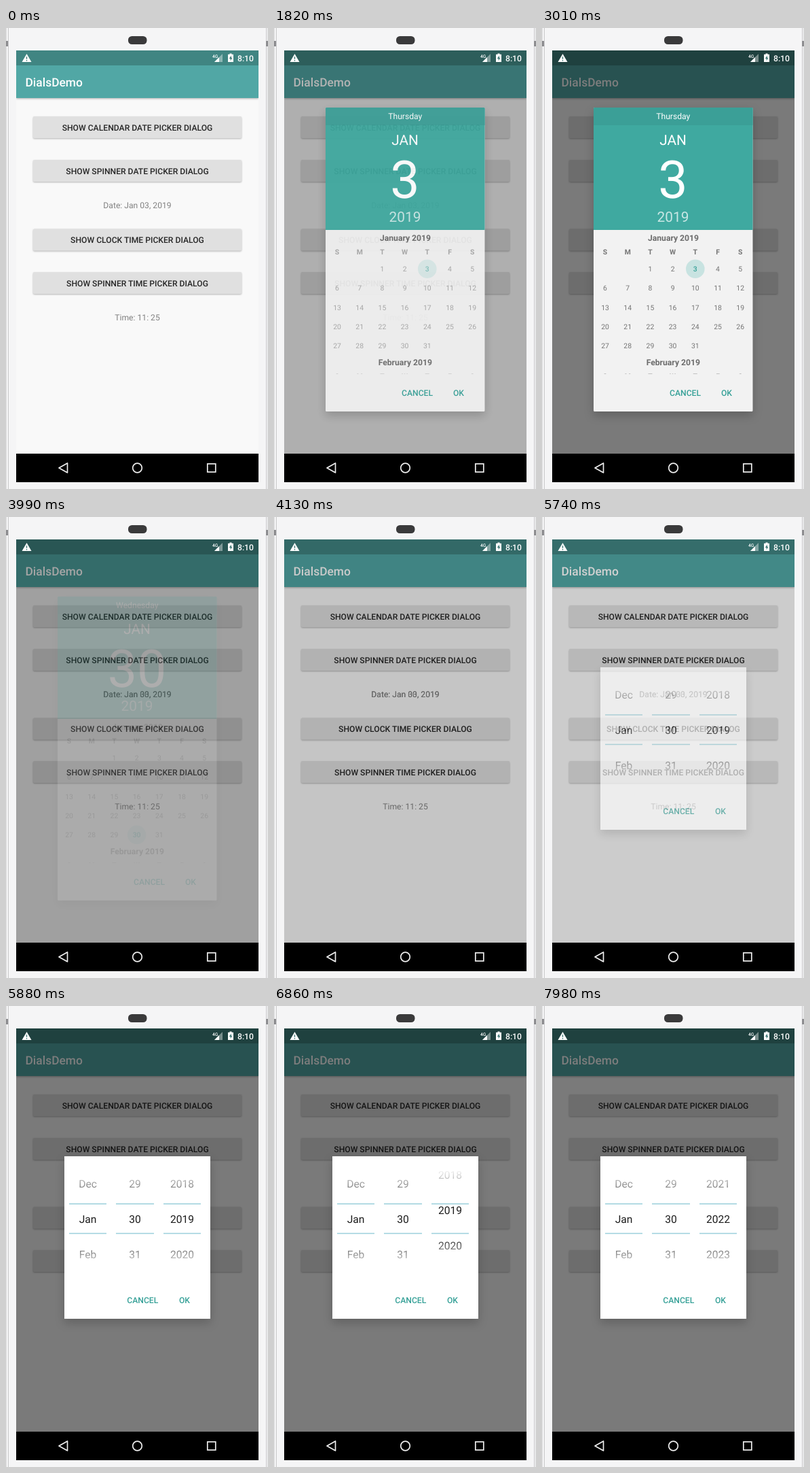
An HTML page for the animation above (8 s loop, 386 by 678 pixels).

```html
<!DOCTYPE html>
<html lang="en">
<head>
<meta charset="utf-8">
<title>Date pickers</title>
<style>
  html, body { margin: 0; width: 100%; height: 100%; overflow: hidden; background: #f5f5f6; }
  svg { display: block; width: 386px; height: 678px; font: 12.15px Roboto, sans-serif; text-rendering: geometricPrecision; }
  .mid { text-anchor: middle; }
  .med { font-weight: 500; }
  .bold { font-weight: 700; }
  .button rect { fill: #e0e0e0; filter: drop-shadow(0 1px .8px rgba(0, 0, 0, .28)); }
  .button text { fill: #262626; font-weight: 500; }
  .label { fill: #828282; }
  .days { font-size: 10.4px; fill: #757575; }
  .wheel { font-size: 15.6px; fill: #1c1c1c; }
  .action { fill: #35a097; font-weight: 500; }
  .card { filter: drop-shadow(0 6px 7px rgba(0, 0, 0, .2)); }

  #dim, #calendar, #spinner, .days, #years, .old, .new, .before, .after {
    animation: 8s linear infinite;
  }
  #dim { animation-name: dim; }
  #calendar { animation-name: calendar; }
  #spinner { animation-name: spinner; }
  .days { animation-name: days; }
  #years { animation-name: years; }
  .old, .new, .before, .after { animation-timing-function: step-end; }
  .old { animation-name: unpick; }
  .new { animation-name: pick; }
  .before { animation-name: unset; }
  .after { animation-name: set; }

  @keyframes dim {
    0%, 20.125% { opacity: 0; }
    22.75% { opacity: .58; }
    24.5% { opacity: .88; }
    26.25%, 48.125% { opacity: 1; }
    51.625% { opacity: .41; }
    53.4% { opacity: .2; }
    56%, 70.8% { opacity: 0; }
    71.75% { opacity: .35; }
    73.5%, 100% { opacity: 1; }
  }
  @keyframes calendar {
    0%, 20.125% { opacity: 0; }
    21.875% { opacity: .65; }
    22.75% { opacity: .93; }
    23.6%, 47.25% { opacity: 1; }
    49.875% { opacity: .15; }
    50.75%, 100% { opacity: 0; }
  }
  @keyframes spinner {
    0%, 70.8% { opacity: 0; }
    71.75% { opacity: .64; }
    72.6%, 100% { opacity: 1; }
  }
  @keyframes days {
    0%, 20% { opacity: .4; }
    22.75% { opacity: .6; }
    25.4%, 100% { opacity: 1; }
  }
  @keyframes years {
    0%, 84.875% { transform: translateY(0); }
    85.75% { transform: translateY(-12.8px); }
    87.5% { transform: translateY(-44px); }
    90% { transform: translateY(-88px); }
    92.5% { transform: translateY(-122px); }
    95.375% { transform: translateY(-147px); }
    98% { transform: translateY(-155px); }
    99.75%, 100% { transform: translateY(-156px); }
  }
  @keyframes pick { 0% { opacity: 0; } 38.5%, 100% { opacity: 1; } }
  @keyframes unpick { 0% { opacity: 1; } 38.5%, 100% { opacity: 0; } }
  @keyframes set { 0% { opacity: 0; } 48.125%, 100% { opacity: 1; } }
  @keyframes unset { 0% { opacity: 1; } 48.125%, 100% { opacity: 0; } }
</style>
</head>
<body>
<svg viewBox="0 0 386 678">
  <defs>
    <linearGradient id="fade" gradientUnits="userSpaceOnUse" x1="0" y1="240" x2="0" y2="388">
      <stop offset="0" stop-color="#000"/>
      <stop offset=".34" stop-color="#fff"/>
      <stop offset=".66" stop-color="#fff"/>
      <stop offset="1" stop-color="#000"/>
    </linearGradient>
    <mask id="edges" maskUnits="userSpaceOnUse" x="86" y="240" width="215" height="148" style="color-interpolation:sRGB">
      <rect x="86" y="240" width="215" height="148" fill="url(#fade)"/>
    </mask>
    <clipPath id="list"><rect x="76" y="297" width="234" height="212"/></clipPath>
    <clipPath id="screen"><rect x="15" y="33" width="357" height="593"/></clipPath>
  </defs>

  <!-- phone body -->
  <rect width="386" height="678" fill="#f5f5f6"/>
  <path d="M3.5 0V678M383.5 0V678" stroke="#c9c8ca"/>
  <path d="M.5 0V678M385.5 0V678" stroke="#dddddf"/>
  <path d="M0 19h3v8h-3zM383 19h3v8h-3z" fill="#8d8d90"/>
  <rect x="180" y="12" width="27.5" height="12" rx="5.5" fill="#3a3a3b"/>

  <!-- app -->
  <g clip-path="url(#screen)">
    <rect x="15" y="33" width="357" height="593" fill="#f9f9f9"/>
    <rect x="15" y="55" width="357" height="48" fill="#51a7a5" style="filter:drop-shadow(0 1.5px 1.5px rgba(0,0,0,.3))"/>
    <rect x="15" y="33" width="357" height="22" fill="#408582"/>
    <text x="28.5" y="86" class="med" font-size="17.4" fill="#fff">DialsDemo</text>
    <g id="buttons"></g>
    <g class="mid label">
      <text class="before" x="193.5" y="265.3">Date: Jan 03, 2019</text>
      <text class="after" x="193.5" y="265.3">Date: Jan 30, 2019</text>
      <text x="193.5" y="430.3">Time: 11: 25</text>
    </g>
    <rect id="dim" x="15" y="33" width="357" height="593" fill="#000" fill-opacity=".51"/>
  </g>

  <!-- status bar icons -->
  <g fill="#fff">
    <path d="M30.5 38L37.5 50H23.5Z"/>
    <path d="M30.5 42.2v3.6M30.5 47v1.6" stroke="#37716f" stroke-width="1.3"/>
    <text x="304" y="43.6" class="med" font-size="6.6">4G</text>
    <path d="M319 38V50H307Z" opacity=".4"/>
    <path d="M314 43V50H307Z"/>
    <path d="M329.5 37.5h3v1.3h2.5v11.2h-8v-11.2h2.5z"/>
    <path d="M331.7 40.5l-2.8 4.6h1.8v3.2l2.6-4.6h-1.6z" fill="#37716f"/>
    <text x="341" y="48.6" class="med">8:10</text>
  </g>

  <!-- navigation bar -->
  <rect x="15" y="626" width="357" height="42" fill="#000"/>
  <g fill="none" stroke="#eee" stroke-width="1.7">
    <path d="M90.5 640V654L78 647Z" stroke-linejoin="round"/>
    <circle cx="193.5" cy="647" r="6.8"/>
    <rect x="296.8" y="641" width="12" height="12"/>
  </g>

  <!-- calendar dialog -->
  <g id="calendar">
    <rect class="card" x="76" y="117" width="234.5" height="447" rx="1.5" fill="#f2f2f2"/>
    <path d="M76 297V118.500q0-1.500 1.500-1.500h231.500q1.500 0 1.500 1.500V297z" fill="#3fa9a0"/>
    <path d="M76 143V118.500q0-1.500 1.500-1.500h231.500q1.500 0 1.500 1.500V143z" fill="#3b9f97"/>
    <g class="mid" fill="#fff">
      <text class="old" x="193.300" y="134.300">Thursday</text>
      <text class="new" x="193.300" y="134.300">Wednesday</text>
      <text x="193" y="171.800" font-size="20.800">JAN</text>
      <text class="old" x="193" y="250.300" font-size="77">3</text>
      <text class="new" x="193" y="250.300" font-size="77">30</text>
      <text x="193" y="284.500" font-size="20.800" opacity=".72">2019</text>
    </g>
    <g class="mid bold" fill="#6c6c6c">
      <text x="193.500" y="312.600">January 2019</text>
      <text x="193.300" y="495.800">February 2019</text>
    </g>
    <g class="mid days" id="days" clip-path="url(#list)"></g>
    <g class="mid action">
      <text x="211" y="541.400">CANCEL</text>
      <text x="272" y="541.400">OK</text>
    </g>
  </g>

  <!-- spinner dialog -->
  <g id="spinner">
    <rect class="card" x="86" y="221" width="215" height="239" fill="#fff"/>
    <path d="M93 291h55m14 0h56m14 0h55M93 334.500h55m14 0h56m14 0h55" stroke="#9bd0dc" stroke-width="1.700"/>
    <g class="mid wheel" mask="url(#edges)">
      <g id="months"></g>
      <g id="dates"></g>
      <g id="years"></g>
    </g>
    <g class="mid action">
      <text x="201.300" y="437.400">CANCEL</text>
      <text x="263" y="437.400">OK</text>
    </g>
  </g>
</svg>
<script>
  const NS = 'http://www.w3.org/2000/svg';

  function add(parent, tag, attrs, text = '') {
    const el = document.createElementNS(NS, tag);
    for (const key in attrs) el.setAttribute(key, attrs[key]);
    el.textContent = text;
    parent.appendChild(el);
    return el;
  }
  const byId = id => document.getElementById(id);

  // main screen buttons
  const buttons = [
    ['CALENDAR DATE', 130], ['SPINNER DATE', 194],
    ['CLOCK TIME', 295.5], ['SPINNER TIME', 359]
  ];
  for (const [kind, y] of buttons) {
    const g = add(byId('buttons'), 'g', { class: 'button mid' });
    add(g, 'rect', { x: 40, y, width: 307, height: 32, rx: 1.7 });
    add(g, 'text', { x: 193.5, y: y + 20.7 }, `SHOW ${kind} PICKER DIALOG`);
  }

  // month grid
  const days = byId('days');
  const colX = i => 93 + 33.2 * i;
  for (const y of [333.2, 516.3])
    [...'SMTWTFS'].forEach((c, i) => add(days, 'text', { x: colX(i), y, class: 'bold' }, c));

  for (let d = 1; d <= 31; d++) {
    const cell = d + 1;
    const x = colX(cell % 7), cy = 354.2 + 28.3 * Math.floor(cell / 7);
    const label = { x, y: cy + 3.8 };
    const mark = d === 3 ? 'old' : d === 30 ? 'new' : '';
    if (!mark) {
      add(days, 'text', label, d);
      continue;
    }
    add(days, 'text', { ...label, class: mark === 'old' ? 'new' : 'old' }, d);
    const on = add(days, 'g', { class: mark });
    add(on, 'circle', { cx: x, cy, r: 13.8, fill: '#c8e3e1' });
    add(on, 'text', { ...label, fill: '#35a097', class: 'med' }, d);
  }

  // spinner wheels, second entry centred
  function wheel(id, x, items) {
    items.forEach((item, i) => add(byId(id), 'text', { x, y: 267 + 52 * i }, item));
  }
  wheel('months', 120.5, ['Dec', 'Jan', 'Feb']);
  wheel('dates', 190, [29, 30, 31]);
  wheel('years', 259.5, [2018, 2019, 2020, 2021, 2022, 2023, 2024]);
</script>
</body>
</html>
```
